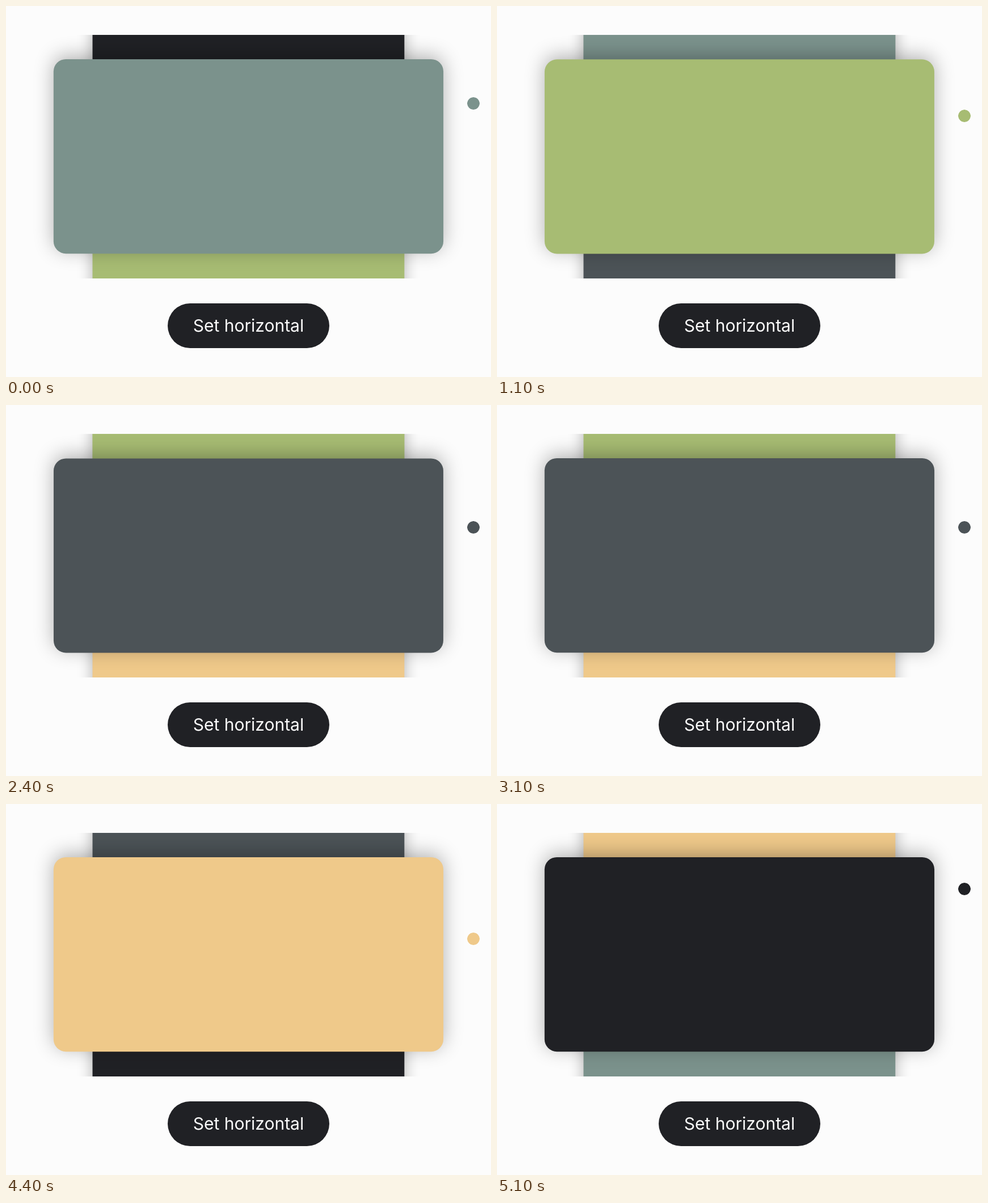
Recreate the animation shown at these times as an HTML page. Size 855x655 px, loop 5.3 s.

```html
<!DOCTYPE html>
<html lang="en">
<head>
<meta charset="utf-8">
<title>Vertical carousel</title>
<style>
  html, body { margin: 0; width: 100%; height: 100%; overflow: hidden; background: #fcfcfc; }
  body { position: relative; }
  #view { position: absolute; left: 0; top: 50.6px; width: 855px; height: 430px; overflow: hidden; }
  .card {
    position: absolute; left: -1.75px; top: 0.3px; width: 858.5px; height: 429.4px;
    border-radius: 27px; box-shadow: 0 -7px 42px rgba(0, 0, 0, .3);
  }
  .dot { position: absolute; left: 813px; width: 22px; height: 22px; border-radius: 50%; overflow: hidden; }
  .dot div { width: 22px; height: 22px; border-radius: 50%; }
  #button {
    position: absolute; left: 285px; top: 525px; width: 285px; height: 79px; border-radius: 40px;
    background: #202125; color: #fcfcfc; text-align: center;
    font: 30px/79px Inter, sans-serif;
  }
</style>
</head>
<body>
<div id="view"></div>
<div id="button">Set horizontal</div>
<script>
const COLORS = ['#202125', '#7b928c', '#a7bc73', '#4c5357', '#efc98a'];
const COUNT = COLORS.length;
const LOOP = 5300, STEP = 100;
const FIRST_PAGE = 1, SLIDES = [875, 2178, 3438, 4690], SLIDE_TIME = 280;
const CARD_SHIFT = 211, DOT = 22;

function add(parent, className) {
  const el = document.createElement('div');
  el.className = className;
  return parent.appendChild(el);
}

const view = document.getElementById('view');
const items = COLORS.map((color, i) => {
  const card = add(view, 'card');
  const dot = add(document.body, 'dot');
  const fill = add(dot, '');
  card.style.background = fill.style.background = color;
  dot.style.top = 139 + i * DOT + 'px';
  return { card, fill };
});

const clamp = x => Math.min(1, Math.max(0, x));
const easeOut = x => 1 - (1 - x) ** 4;
const position = t => SLIDES.reduce(
  (sum, start) => sum + easeOut(clamp((t - start) / SLIDE_TIME)), FIRST_PAGE);

// Signed distance to the current page around the ring of pages
function offset(i, pos) {
  const d = i - pos;
  return d - COUNT * Math.round(d / COUNT);
}

function draw(t) {
  const pos = position(t);
  items.forEach(({ card, fill }, i) => {
    const d = offset(i, pos), far = Math.abs(d);
    const scale = 0.8 - 0.16 * Math.min(1, far);
    card.style.transform = `translateY(${d * CARD_SHIFT}px) scale(${scale})`;
    card.style.zIndex = Math.round(1000 - far * 100);
    fill.style.transform = `translateY(${-d * DOT}px)`;
    fill.style.visibility = far < 1 ? 'visible' : 'hidden';
  });
}

const begin = performance.now();
function tick() {
  const t = (performance.now() - begin) % LOOP;
  draw(Math.floor(t / STEP) * STEP);
  requestAnimationFrame(tick);
}
tick();
</script>
</body>
</html>
```
